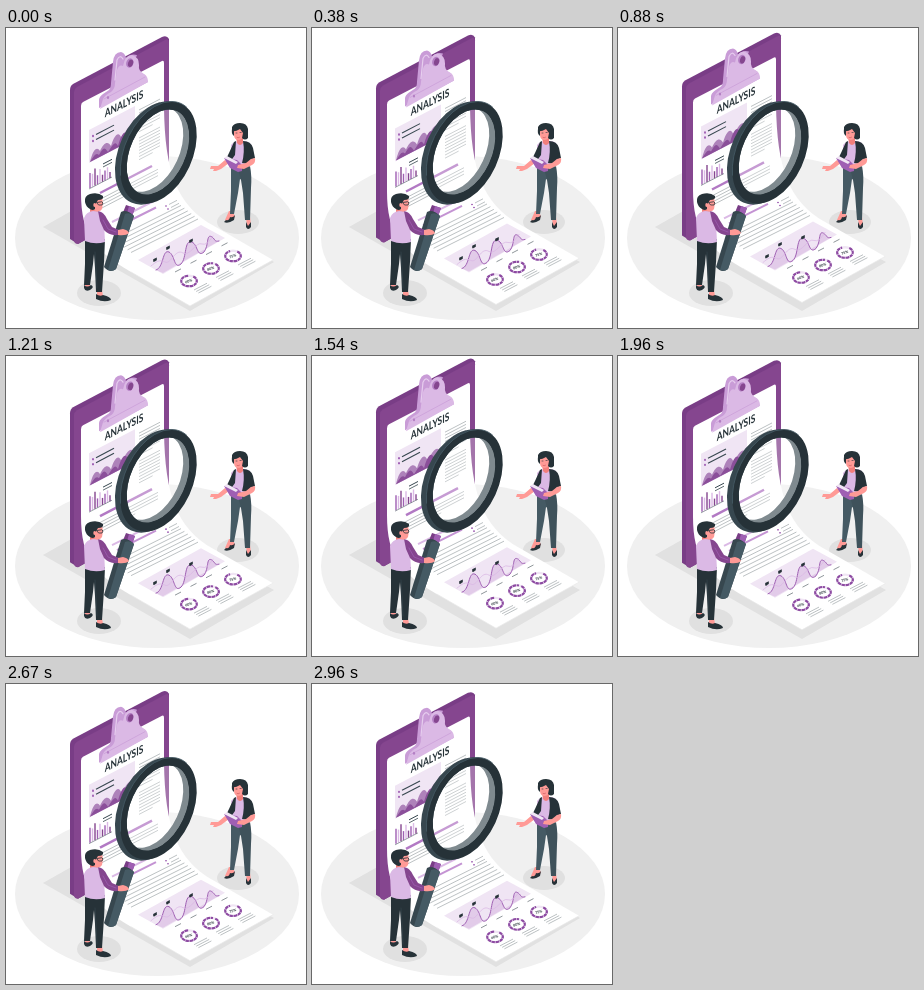
These frames come from a looping animation (300 by 300 pixels, 3000 ms). An HTML page with a canvas:

```html
<!DOCTYPE html>
<html lang="en">
<head>
<meta charset="utf-8">
<title>Analysis</title>
<style>
html, body { margin: 0; width: 100%; height: 100%; overflow: hidden; background: #fff; }
canvas { display: block; width: 100vw; height: 100vh; }
</style>
</head>
<body>
<canvas id="stage"></canvas>
<script>
const canvas = document.getElementById('stage');
const ctx = canvas.getContext('2d');
const LOOP = 3000, LIFT = 6;
const INK = '#263238', SLATE = '#37474f', STEEL = '#455a64', GREY = '#a0a6a9';
const PURPLE = '#85468f', DEEP = '#793d86', MID = '#9f5fb3', LILAC = '#dbb9e5', PALE = '#f0e5f4';
const SKIN = '#ff9a96', BLUSH = '#f27f7c';

function fill(d, color) {
  ctx.fillStyle = color;
  ctx.fill(new Path2D(d));
}

function stroke(d, color, width, cap = 'round') {
  ctx.strokeStyle = color;
  ctx.lineWidth = width;
  ctx.lineCap = cap;
  ctx.lineJoin = 'round';
  ctx.stroke(new Path2D(d));
}

function oval(x, y, rx, ry, color, turn = 0) {
  ctx.fillStyle = color;
  ctx.beginPath();
  ctx.ellipse(x, y, rx, ry, turn, 0, Math.PI * 2);
  ctx.fill();
}

// A line that runs up to the right along the isometric axis.
function slant(x, y, len, color, width, slope = -0.52) {
  stroke(`M${x} ${y}l${len} ${len * slope}`, color, width, 'butt');
}

function rows(x, y, len, count, gap) {
  for (let i = 0; i < count; i++) {
    slant(x, y + i * gap, len * (i === count - 1 ? 0.65 : 1), GREY, 0.7);
  }
}

function label(text, x, y, font, matrix, color) {
  ctx.save();
  ctx.transform(...matrix, x, y);
  ctx.font = font;
  ctx.fillStyle = color;
  ctx.textAlign = 'center';
  ctx.fillText(text, 0, 0);
  ctx.restore();
}

function floor() {
  oval(151, 210, 142, 82, '#f0f0f0');
  fill('M37 199L120 152L268 234L184 283Z', '#e1e1e1');
  oval(93, 265, 22, 13, '#e0e0e0');
  oval(232, 194, 21, 12, '#e0e0e0');
}

function board() {
  fill('M64 62Q64 58 67 56L156 9Q161 7 163 11V165L72 216L64 211Z', DEEP);
  fill('M68 64Q68 61 71 59L159 12Q163 10 163 14V165L72 216Q68 216 68 212Z', PURPLE);
}

function sheet() {
  fill('M75 78Q75 75 77 74L156 33Q158 32 158 35V80C159 143 170 177 208 198L267 232L184 278L125 244C89 223 75 207 75 165Z', '#fff');
  stroke('M125 244L184 278L267 232', '#e8e8e8', 0.7);
}

function clip() {
  fill('M93 80V72Q93 69 97 66L103 62Q105 60 105 55L107 34Q108 24 115 24Q119 25 120 30Q125 25 131 27L126 40L139 47L142 54Z', '#c99cd7');
  fill('M94 81L97 71Q99 67 105 64Q109 61 109 55L111 42Q113 36 117 38Q119 27 126 27Q133 29 133 37Q132 43 138 46Q142 48 142 54Z', LILAC);
  stroke('M109 52L111 32Q114 26 117 31', '#e6cdee', 1.2);
  oval(123.8, 35, 3.6, 4.8, '#b47fc4', 0.3);
  oval(124.6, 35.3, 2.5, 3.8, PURPLE, 0.3);
  stroke('M98 71L139 49', '#c99cd7', 0.7);
  oval(102, 69.5, 1.1, 1.5, '#b47fc4');
}

function topCharts() {
  label('ANALYSIS', 118, 79.6, 'bold 10.5px Lato, sans-serif', [0.8, -0.41, 0, 1.08], INK);

  fill('M83 102L129 78V111L83 135Z', PALE);
  for (let i = 0; i < 2; i++) {
    oval(87, 108 + i * 5, 1, 1.2, MID);
    slant(90, 106.5 + i * 5, 18, SLATE, 1.1);
  }
  fill('M84 134C87 121 91 118 94 123C98 114 102 113 105 118C109 105 113 103 116 111C120 101 125 95 128 101V111Z', '#ae82ba');
  fill('M84 134C88 128 90 124 93 127C97 120 98 118 102 124C107 117 109 112 112 118C115 107 119 100 122 108C125 106 127 105 128 106V111Z', '#8b4f9a');

  rows(133, 82, 21, 8, 3.1);
  rows(133, 110, 21, 8, 3.1);

  slant(97, 136, 9, SLATE, 1);
  slant(97, 139, 9, SLATE, 0.8);
  const bars = [15, 13, 17, 9, 14, 7, 10, 12, 6];
  bars.forEach((h, i) => {
    const x = 84 + i * 2.5, y = 160 - i * 1.25;
    stroke(`M${x} ${y}V${y - h}`, i % 3 === 1 ? LILAC : i % 3 ? PURPLE : MID, 1.4, 'butt');
  });
  slant(83, 161, 23, SLATE, 0.5);

  slant(94, 165, 52, '#b279c4', 2.4);
  rows(87, 175, 65, 4, 3.2);
}

function midText() {
  slant(106, 194, 42, LILAC, 2, -0.5);
  slant(111, 199, 39, '#c493d3', 2, -0.5);
  for (let i = 0; i < 2; i++) {
    oval(160 + i * 2, 178 + i * 3, 1, 0.8, MID);
    slant(163 + i * 2, 176.5 + i * 3, 8, GREY, 0.7);
  }
  for (let i = 0; i < 6; i++) {
    slant(108 + i * 3.4, 211 + i * 2.7, 67, GREY, 0.7, -0.5);
  }
}

function lowChart() {
  fill('M132 232L195 197L219 210L157 246Z', PALE);
  const wave = 'M150 242C158 240 156 221 163 224C169 227 168 242 175 236C181 230 178 211 186 214C192 217 191 230 198 224C203 218 200 205 206 209C210 212 208 214 213 213';
  fill(wave + 'L157 245Z', '#e2cbe9');
  stroke(wave, MID, 1);
  stroke('M145 238C150 234 153 231 159 234C165 237 169 220 177 225C184 229 190 213 196 216Q201 218 207 208', LILAC, 0.8);
  for (const [x, y] of [[149, 232], [162, 220], [185, 213]]) {
    fill(`M${x - 1.8} ${y - 0.8}l3.6 -1.8v2.8l-1.4 .7l-.6 1.2l-.4 -.8l-1.2 .6Z`, INK);
  }
  for (let i = 0; i < 4; i++) slant(169 + i * 15.5, 244 - i * 8.7, 6, '#838b8f', 0.9);
}

function donut(x, y, text, share) {
  oval(x, y, 9, 6.4, PALE);
  ctx.save();
  ctx.strokeStyle = '#8d4ba2';
  ctx.lineWidth = 2.3;
  ctx.lineCap = 'butt';
  ctx.setLineDash([3.4, 0.6]);
  ctx.beginPath();
  ctx.ellipse(x, y, 7.8, 5.2, 0, -1, -1 + Math.PI * 2 * share);
  ctx.stroke();
  ctx.restore();
  oval(x, y, 6.4, 4.1, '#fff');
  label(text, x, y + 1.3, 'bold 3.8px Lato, sans-serif', [0.95, -0.3, 0.25, 0.9], INK);
  for (let i = 0; i < 3; i++) slant(x + 5 + i * 2.2, y + 9 + i * 1.5, 13, GREY, 0.7);
}

function clipboard() {
  board();
  sheet();
  topCharts();
  clip();
  midText();
  lowChart();
  donut(183, 253, '60%', 0.9);
  donut(205, 240.5, '80%', 0.95);
  donut(227, 228, '75%', 0.85);
}

const TILT = 0.43;

// The part of one tilted ellipse that lies outside a second one.
function ring([x, y, long, short], [hx, hy, hLong, hShort], color) {
  ctx.save();
  const hole = new Path2D('M0 0H300V300H0Z');
  hole.moveTo(hx, hy);
  hole.closePath();
  const cut = new Path2D();
  cut.ellipse(hx, hy, hShort, hLong, TILT, 0, Math.PI * 2);
  hole.addPath(cut);
  ctx.clip(hole, 'evenodd');
  oval(x, y, short, long, color, TILT);
  ctx.restore();
}

function magnifier() {
  const lens = [152, 124, 45, 27.5];
  oval(152, 124, 27.5, 45, 'rgba(255,255,255,.25)', TILT);
  fill('M120 177L129 180L125 191L116 187Z', DEEP);
  fill('M123 178L129 180L125 191L120 189Z', MID);
  fill('M115 184Q121 181 128 188L110 241Q104 246 98 239Z', SLATE);
  fill('M119 186Q124 184 128 188L110 241Q107 244 102 242Z', STEEL);

  ring(lens, [146, 121.3, 45, 27.5], '#7f8a8f');
  ring([148, 125, 54.5, 35], lens, SLATE);
  ring([152.5, 124.5, 54, 34], lens, INK);
  ctx.strokeStyle = STEEL;
  ctx.lineWidth = 0.9;
  ctx.beginPath();
  ctx.ellipse(152.5, 124.5, 34, 54, TILT, 2.4, 4.9);
  ctx.stroke();
}

function man() {
  fill('M79 254L84 254L84 260L79 260Z', SKIN);
  fill('M91 262L96 262L97 268L91 268Z', SKIN);
  fill('M78 257Q81 260 85 257Q89 259 84 262Q79 264 78 260Z', INK);
  fill('M90 266Q94 269 97 267Q105 269 105 272Q98 275 90 271Z', INK);
  fill('M79 211H99L98 234L96 264H90L89 240L88 226L87 236L84 257H78L79 236Z', INK);
  stroke('M89 224L90 240L91 260', SLATE, 0.6);

  fill('M84 180H92V188H84Z', BLUSH);
  fill('M78 190Q80 184 87 183L96 184Q99 188 98 195L99 214Q89 217 79 213Z', LILAC);
  fill('M92 183Q98 184 101 191L106 199L113 202L112 207Q103 208 98 202L94 193Z', PURPLE);
  stroke('M97 192L102 201L110 204', MID, 0.7);
  fill('M112 202L117 201Q122 202 123 205Q120 208 112 207Z', SKIN);

  fill('M86 170L96 170L97 175L96 181Q94 185 87 182Z', SKIN);
  fill('M79 174Q78 168 84 166Q92 164 97 168Q98 172 92 172L89 177L89 181Q87 183 84 181Q80 179 79 174Z', INK);
  oval(88.7, 177, 1.4, 1.9, SKIN);
  stroke('M91 174.5L94 174Q96 173 97 175L96 177L93 177Z', INK, 0.8);
}

function woman() {
  fill('M223 183H227L229 189L221 194L219 192ZM240 189H244L245 197L241 199Z', SKIN);
  fill('M224 189Q227 190 229 187L228 192Q222 196 218 194L220 192Q223 193 224 189Z', INK);
  fill('M240 194L242 198L245 194V199Q242 203 240 199Z', INK);
  fill('M225 138H243L240 154L234 151L232 165L228 186H224L225 163Z', STEEL);
  fill('M233 144L235 152L237 165L239 192H244L245 160Q246 148 244 138Z', '#3f525b');

  fill('M225 117Q229 112 239 113Q245 114 246 119L243 138H226Z', LILAC);
  fill('M228 114L223 125L220 131L224 134L229 127L230 113Z', INK);
  fill('M237 113Q245 113 247 120L249 130L244 132L243 136L236 135Q239 124 237 113Z', INK);
  fill('M219 132L223 135L215 141L210 143L207 143L208 141L204 141L205 138L212 138Z', SKIN);
  fill('M218 130L231 132L236 137V143L232 144L224 140Z', MID);
  fill('M218 130L221 128L232 134L230 136Z', PALE);
  fill('M245 131L249 130Q250 135 246 137L238 141L231 140L232 137L240 135Z', SKIN);

  fill('M230 109H237V115Q234 119 231 115Z', BLUSH);
  fill('M227 100Q230 97 236 98Q239 100 239 105Q238 111 233 112Q228 112 228 107Z', SKIN);
  fill('M226 99Q228 95 234 95Q241 95 242 101L242 110Q239 113 236 110L237 105L234 101Q229 104 226 103Z', INK);
  fill('M226 101Q225 106 228 108L228 102Z', INK);
  stroke('M230 105h1M234 104.5h1.2', INK, 0.6);
  stroke('M231 109.5Q232 110.3 233.5 109.3', '#c95358', 0.6);
}

function draw(now) {
  const dpr = window.devicePixelRatio || 1;
  const w = Math.round(innerWidth * dpr), h = Math.round(innerHeight * dpr);
  if (canvas.width !== w || canvas.height !== h) {
    canvas.width = w;
    canvas.height = h;
  }
  ctx.setTransform(w / 300, 0, 0, h / 300, 0, 0);
  ctx.fillStyle = '#fff';
  ctx.fillRect(0, 0, 300, 300);

  const p = (now % LOOP) / LOOP;
  const rise = LIFT * (1 - Math.abs(2 * p - 1));
  floor();
  ctx.save();
  ctx.translate(0, -rise);
  clipboard();
  ctx.restore();
  magnifier();
  man();
  woman();
}

const start = performance.now();
function tick() {
  draw(performance.now() - start);
  requestAnimationFrame(tick);
}
tick();
</script>
</body>
</html>
```
